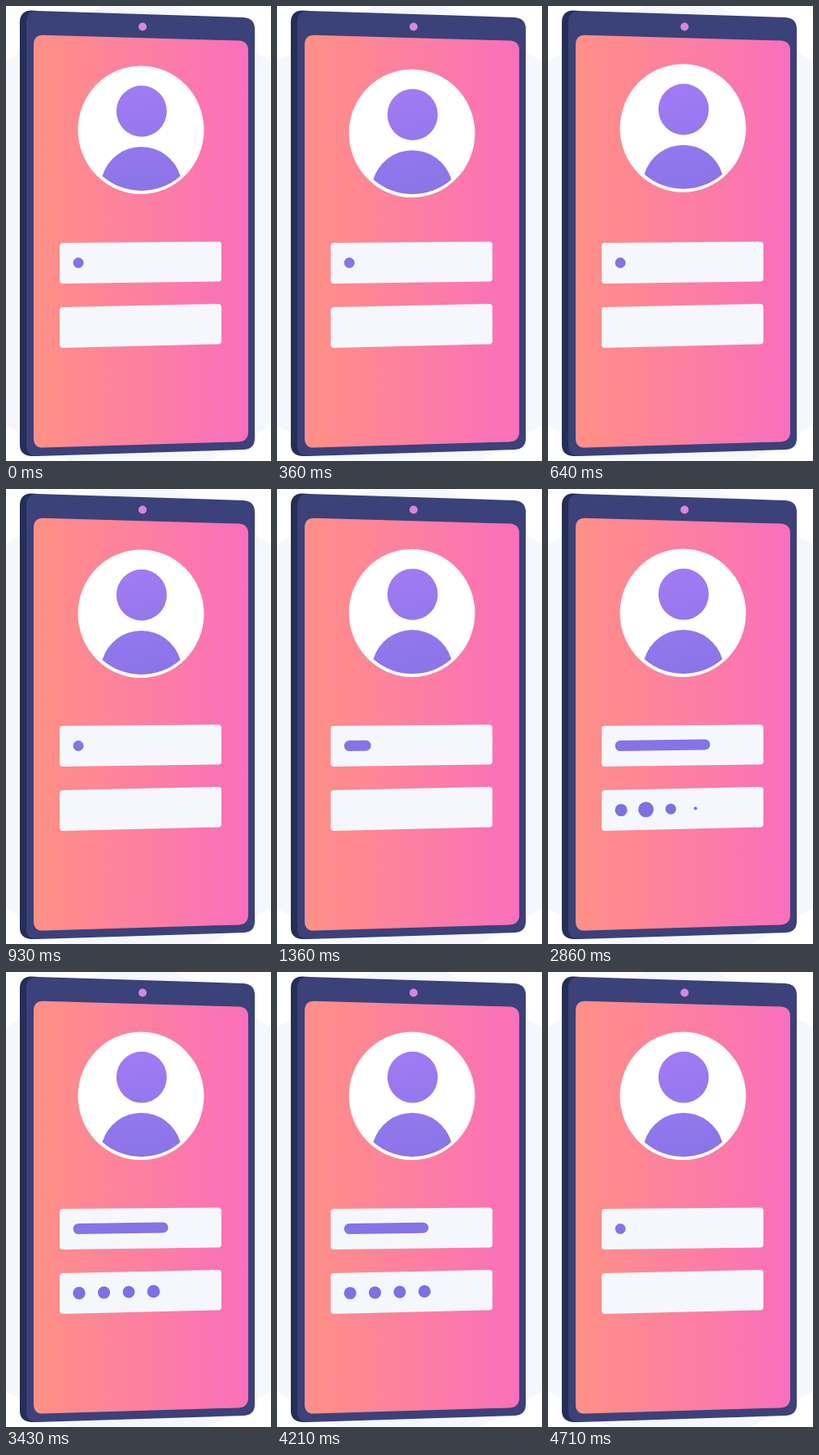
These frames come from a looping animation (326 px wide and 559 px high, 4780 ms). An HTML page:

```html
<!DOCTYPE html>
<html lang="en">
<head>
<meta charset="utf-8">
<title>Login screen</title>
<style>
  html, body { margin: 0; height: 100%; overflow: hidden; background: #fff; }
  svg { display: block; width: 326px; height: 559px; }
  .field { fill: #f5f7fc; stroke: #f5f7fc; stroke-width: 8; stroke-linejoin: round; }
</style>
</head>
<body>
<svg viewBox="0 0 326 559">
  <defs>
    <linearGradient id="screen" gradientUnits="userSpaceOnUse" x1="34" y1="0" x2="298" y2="0">
      <stop stop-color="#ff9085"/><stop offset="1" stop-color="#fa6fbc"/>
    </linearGradient>
    <linearGradient id="purple" gradientUnits="userSpaceOnUse" x1="155" y1="98" x2="175" y2="228">
      <stop stop-color="#a07bf4"/><stop offset="1" stop-color="#8a74e8"/>
    </linearGradient>
  </defs>

  <path fill="#f5f7fc" d="M-20 79.5 163-26 346 79.5V503.500L163 609-20 503.500Z"/>

  <path fill="#242f57" d="M31 5.500 40 6V553H31Q17 552 17 539V20Q17 6 31 5.500Z"/>
  <path fill="#3b4179" d="M39 6 292 14Q306 15 306 28V531Q306 544 293 545L39 553Q25 553 25 540V20Q25 6 39 6Z"/>
  <path fill="url(#screen)" d="M46 35.800 286 42.600Q298 43 298 55V523Q298 535 286 535.400L46 542.600Q34 543 34 531V48Q34 35.500 46 35.800Z"/>
  <circle cx="168" cy="25.500" r="5" fill="#d985e0"/>

  <g id="avatar">
    <ellipse cx="166" cy="152.300" rx="77.500" ry="78.700" fill="#fff"/>
    <g fill="url(#purple)">
      <ellipse cx="166.800" cy="129.300" rx="31" ry="31.500"/>
      <path d="M118.500 209A50 50 0 0 1 214.500 209A73 73 0 0 1 118.500 209Z"/>
    </g>
  </g>

  <path class="field" d="M70 295 261 293.500V334.500L70 337Z"/>
  <path class="field" d="M70 374 261 370V411.500L70 416Z"/>
  <line id="bar" x1="89" y1="315.500" stroke="#8673e6" stroke-width="13" stroke-linecap="round"/>
  <g id="dots" fill="#806fe3"></g>
</svg>
<script>
  const LOOP = 4780;
  const avatar = document.getElementById('avatar');
  const bar = document.getElementById('bar');
  const dots = Array.from({ length: 4 }, (_, i) => {
    const dot = document.createElementNS('http://www.w3.org/2000/svg', 'circle');
    dot.setAttribute('cx', 90 + 30.5 * i);
    dot.setAttribute('cy', 394.5 - 0.7 * i);
    return document.getElementById('dots').appendChild(dot);
  });

  const progress = (t, start, duration) => Math.min(1, Math.max(0, (t - start) / duration));
  const smooth = p => p * p * (3 - 2 * p);

  // Damped oscillation, ms after its start
  const ring = (ms, amp, hz, decay) =>
    amp * Math.sin(2 * Math.PI * hz * ms / 1000) * Math.exp(-decay * ms / 1000);

  function avatarOffset(t) {
    const landing = 325;
    return t < landing ? -4.5 * Math.sin(Math.PI * t / landing) : ring(t - landing, 11, 2, 4);
  }

  function dotScale(t, i) {
    const age = t - 2535 - 94 * i, rise = 160;
    const out = progress(t, 4200 + 50 * i, 340);
    const pop = age < rise ? Math.max(0, age / rise) : 1 + ring(age - rise, 0.37, 3, 5);
    return Math.max(0, pop - (4 * out - 3) * out * out);
  }

  function draw(t) {
    avatar.setAttribute('transform', `translate(0 ${avatarOffset(t)})`);
    const length = smooth(progress(t, 930, 1530)) - progress(t, 4140, 560);
    bar.setAttribute('x2', 89.01 + 104 * length);
    bar.setAttribute('y2', 315.5 - 1.5 * length);
    dots.forEach((dot, i) => dot.setAttribute('r', 7.6 * dotScale(t, i)));
  }

  const start = performance.now();
  function frame() {
    draw((performance.now() - start) % LOOP);
    requestAnimationFrame(frame);
  }
  frame();
</script>
</body>
</html>
```
